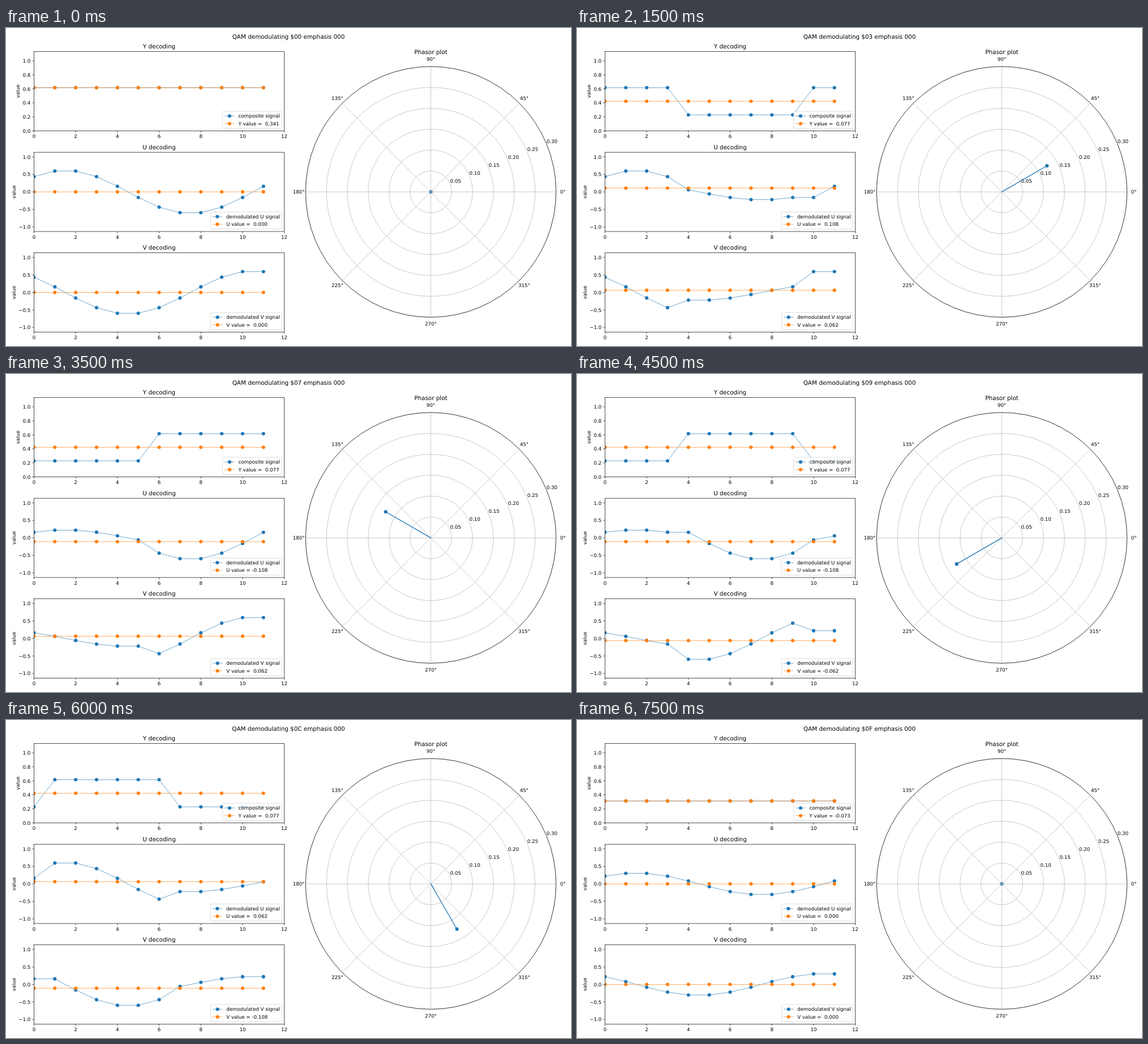
Write an HTML page that moves like this. It is 998 px wide and 561 px high and loops after 8000 ms.

```html
<!DOCTYPE html>
<html lang="en">
<head>
<meta charset="utf-8">
<title>QAM demodulation</title>
<style>
  html, body { margin: 0; width: 100%; height: 100%; overflow: hidden; background: #fff; }
  svg { display: block; width: 998px; height: 561px; }
  text { font-family: "DejaVu Sans", sans-serif; white-space: pre; text-rendering: geometricPrecision; }
</style>
</head>
<body>
<svg id="stage" viewBox="0 0 998 561"></svg>
<script>
const BLUE = '#1f77b4', ORANGE = '#ff7f0e', GRID = '#b0b0b0';
const PT = 0.8663;                       // pixels per typographic point
const SMALL = 10 * PT, LARGE = 12 * PT;
const THIN = 0.8 * PT, PLOT_LINE = 0.75 * PT, DOT = 3.5 * PT;
const LEFT = 49.4, RIGHT = 491.6, HEIGHT = 139.8, LIMIT = 1.132;
const SAMPLES = 12, STEP = 500, HUES = 16;
const HIGH = 0.616, LOW = 0.228, BLANK = 0.312;
const STEP_X = (RIGHT - LEFT) / SAMPLES;
const indices = [...Array(SAMPLES).keys()];
const stage = document.getElementById('stage');

function add(parent, tag, attrs = {}) {
  const node = document.createElementNS('http://www.w3.org/2000/svg', tag);
  for (const key in attrs) node.setAttribute(key, attrs[key]);
  return parent.appendChild(node);
}

function label(parent, x, y, content, anchor = 'middle', size = SMALL, extra = {}) {
  const node = add(parent, 'text', { x, y, 'text-anchor': anchor, 'font-size': size, ...extra });
  node.textContent = content;
  return node;
}

function line(parent, x1, y1, x2, y2, stroke = '#000', width = THIN) {
  return add(parent, 'line', { x1, y1, x2, y2, stroke, 'stroke-width': width });
}

function addSeries(parent, color) {
  const path = add(parent, 'polyline', {
    fill: 'none', stroke: color, 'stroke-width': PLOT_LINE, 'stroke-linejoin': 'round'
  });
  const dots = indices.map(i => add(parent, 'circle', { cx: LEFT + i * STEP_X, r: DOT, fill: color }));
  return ys => {
    path.setAttribute('points', ys.map((y, i) => `${LEFT + i * STEP_X},${y}`).join(' '));
    dots.forEach((dot, i) => dot.setAttribute('cy', ys[i]));
  };
}

function addLegend(bottom, width, rows) {
  const right = RIGHT - 5 * PT, base = bottom - 5 * PT, left = right - width;
  add(stage, 'rect', {
    x: left, y: base - 30.1, width, height: 30.1, rx: 2 * PT,
    fill: '#fff', 'fill-opacity': 0.8, stroke: '#ccc', 'stroke-opacity': 0.8, 'stroke-width': PT
  });
  return rows.map((content, i) => {
    const x = left + 4 * PT, y = base - 21.9 + i * 13.5, color = i ? ORANGE : BLUE;
    line(stage, x, y, x + 20 * PT, y, color, PLOT_LINE);
    add(stage, 'circle', { cx: x + 10 * PT, cy: y, r: DOT, fill: color });
    return label(stage, x + 28 * PT, y + 3.03, content, 'start');
  })[1];
}

function addChart({ name, top, min, tick, labelX, legendWidth, signal }) {
  const bottom = top + HEIGHT, scale = HEIGHT / (LIMIT - min);
  const toY = v => bottom - (v - min) * scale;
  const id = 'clip' + name;
  add(add(stage, 'clipPath', { id }), 'rect', { x: LEFT, y: top, width: RIGHT - LEFT, height: HEIGHT });

  const plot = add(stage, 'g', { 'clip-path': `url(#${id})` });
  const setSignal = addSeries(plot, BLUE), setMean = addSeries(plot, ORANGE);

  for (let x = 0; x <= SAMPLES; x += 2) {
    const px = LEFT + x * STEP_X;
    line(stage, px, bottom, px, bottom + 3.5 * PT);
    label(stage, px, bottom + 12.9, x);
  }
  for (let n = min < 0 ? -2 : 0; n * tick < 1.01; n++) {
    const y = toY(n * tick);
    line(stage, LEFT - 3.5 * PT, y, LEFT, y);
    label(stage, LEFT - 7 * PT, y + 3.2, (n * tick).toFixed(1).replace('-', '\u2212'), 'end');
  }
  add(stage, 'rect', {
    x: LEFT, y: top, width: RIGHT - LEFT, height: HEIGHT, fill: 'none', stroke: '#000', 'stroke-width': THIN
  });
  label(stage, (LEFT + RIGHT) / 2, top - 6 * PT, name + ' decoding', 'middle', LARGE);
  const middle = top + HEIGHT / 2;
  label(stage, labelX, middle, 'value', 'middle', SMALL, { transform: `rotate(-90 ${labelX} ${middle})` });
  const valueText = addLegend(bottom, legendWidth, [signal, '']);

  return (values, mean, shown = mean) => {
    setSignal(values.map(toY));
    setMean(values.map(() => toY(mean)));
    valueText.textContent = `${name} value = ${signed(shown)}`;
  };
}

function addPhasor(cx, cy, radius) {
  const scale = radius / 0.3;
  const polar = (r, degrees) => {
    const a = degrees * Math.PI / 180;
    return [cx + r * Math.cos(a), cy - r * Math.sin(a)];
  };
  const ring = (r, stroke) => add(stage, 'circle', { cx, cy, r, fill: 'none', stroke, 'stroke-width': THIN });

  const tip = add(stage, 'circle', { r: 3.1, fill: BLUE });
  for (let angle = 0; angle < 360; angle += 45) {
    line(stage, cx, cy, ...polar(radius, angle), GRID);
    const [x, y] = polar(radius + 14 * PT, angle);
    label(stage, x, y + 2.5, angle + '°');
  }
  for (let n = 1; n <= 6; n++) {
    const r = n * 0.05 * scale;
    ring(r, GRID);
    const [x, y] = polar(r, 22.5);
    label(stage, x, y - 1.8, (n * 0.05).toFixed(2), 'start');
  }
  const stem = line(stage, cx, cy, cx, cy, BLUE, 1.5 * PT);
  ring(radius, '#000');
  label(stage, cx, 46.2, 'Phasor plot', 'middle', LARGE);

  return (u, v) => {
    const x = cx + u * scale, y = cy - v * scale;
    tip.setAttribute('cx', x);
    tip.setAttribute('cy', y);
    stem.setAttribute('x2', x);
    stem.setAttribute('y2', y);
  };
}

function signed(value) {
  const rounded = Math.abs(value) < 0.0005 ? 0 : value;
  return (rounded < 0 ? '' : ' ') + rounded.toFixed(3);
}

function composite(hue, i) {
  if (hue === 0) return HIGH;
  if (hue === 13) return LOW;
  if (hue > 13) return BLANK;
  return (i + hue + 5) % SAMPLES < 6 ? LOW : HIGH;
}

const average = list => list.reduce((sum, v) => sum + v, 0) / list.length;
const phase = i => (45 + 30 * i) * Math.PI / 180;

const heading = label(stage, 499, 19.1, '', 'middle', LARGE);
const showY = addChart({
  name: 'Y', top: 41.6, min: 0, tick: 0.2, labelX: 23.9, legendWidth: 104.5, signal: 'composite signal'
});
const showU = addChart({
  name: 'U', top: 219.2, min: -LIMIT, tick: 0.5, labelX: 17, legendWidth: 126.1, signal: 'demodulated U signal'
});
const showV = addChart({
  name: 'V', top: 396.6, min: -LIMIT, tick: 0.5, labelX: 17, legendWidth: 125.7, signal: 'demodulated V signal'
});
const showPhasor = addPhasor(750.4, 289.1, 221.2);

function render(hue) {
  const signal = indices.map(i => composite(hue, i));
  const uSignal = signal.map((s, i) => s * Math.sin(phase(i)));
  const vSignal = signal.map((s, i) => s * Math.cos(phase(i)));
  const y = average(signal), u = average(uSignal), v = average(vSignal);
  heading.textContent = `QAM demodulating $0${hue.toString(16).toUpperCase()} emphasis 000`;
  showY(signal, y, (y - 0.3654) * 1.361);
  showU(uSignal, u);
  showV(vSignal, v);
  showPhasor(u, v);
}

let start = null, current = -1;
function tick(now) {
  start ??= now;
  const hue = Math.floor((now - start) / STEP) % HUES;
  if (hue !== current) render(current = hue);
  requestAnimationFrame(tick);
}
render(0);
requestAnimationFrame(tick);
</script>
</body>
</html>
```
